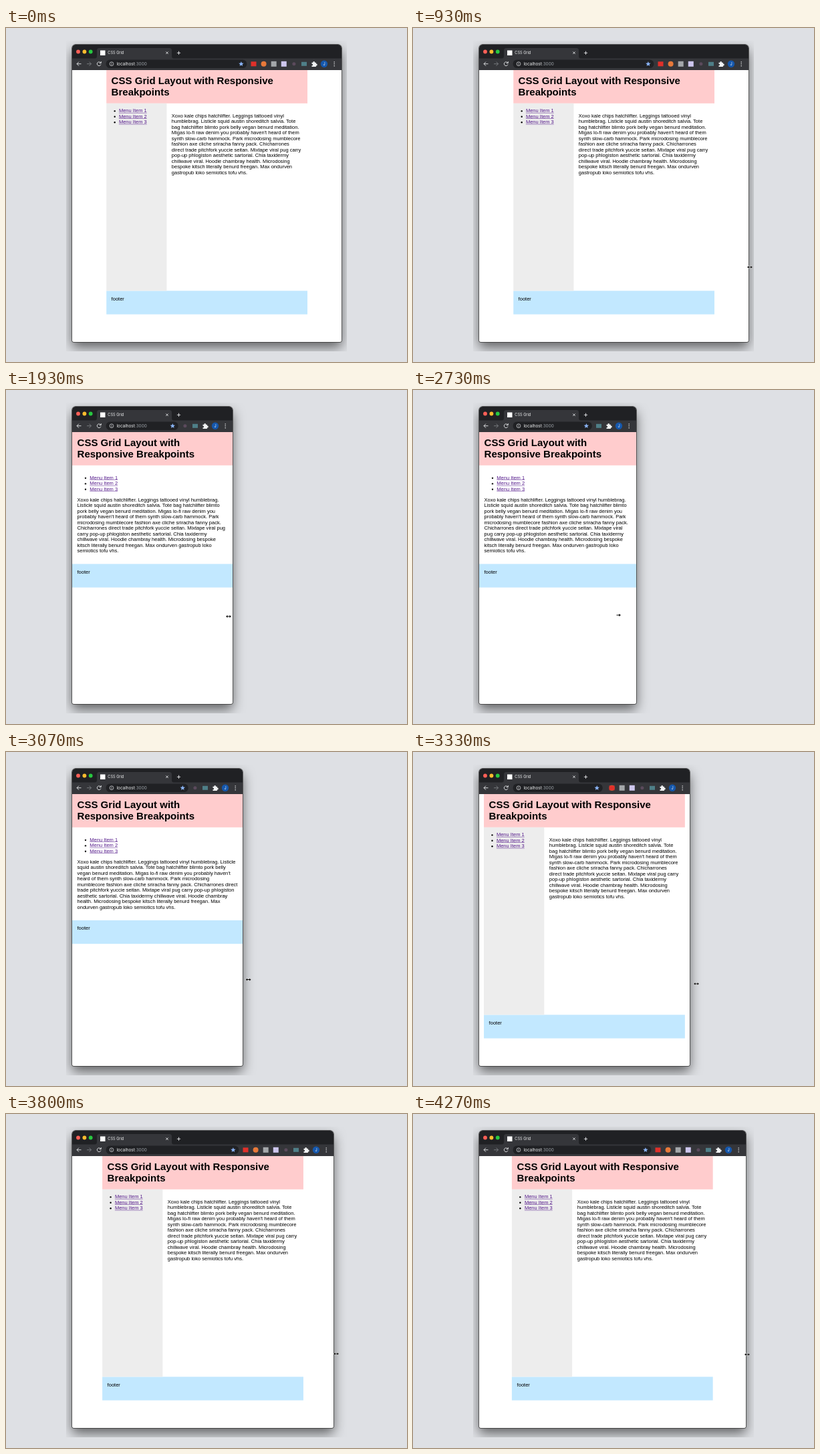
These frames come from a looping animation (600 by 500 pixels, 4.33 s). An HTML page:

```html
<!DOCTYPE html>
<html lang="en">
<head>
<meta charset="utf-8">
<title>Responsive grid</title>
<style>
html, body { margin: 0; width: 100%; height: 100%; overflow: hidden; background: #dee0e4; }
#clip { position: absolute; left: 90px; top: 19px; width: 420px; height: 465px; overflow: hidden; }
#win {
  position: absolute; left: 9px; top: 6px; height: 444.5px; overflow: hidden;
  background: #fff; border-radius: 5px 5px 2.5px 2.5px;
  box-shadow: 0 0 0 .7px #333, 0 8px 18px rgba(0, 0, 0, .58);
}
#bar { position: absolute; left: -99px; top: -25px; font-family: Inter, Roboto, sans-serif; }
#cursor { position: absolute; left: 0; top: 0; }
#page {
  position: absolute; left: 0; top: 37.5px; transform: scale(.47); transform-origin: 0 0;
  font: 16px/18px "Liberation Sans", Arial, sans-serif; color: #000;
}
#site { margin: 0 auto; }
header { background: #ffcccd; padding: 16px; }
h1 { margin: 0; font-size: 32px; line-height: 37px; }
h1, li, p { position: relative; top: -1px; }
main { padding: 16px; }
ul { margin: 16px 0; padding-left: 40px; }
p { margin: 16px 0; }
a { color: #551a8b; text-decoration: underline; }
footer { box-sizing: border-box; height: 75px; padding: 16px; background: #c2e8ff; }
.wide #site { width: 640px; }
.wide main { display: grid; grid-template-columns: 30% 70%; height: 597px; padding: 0; }
.wide nav { background: #ededed; }
.wide article { padding: 16px; }
</style>
</head>
<body>
<div id="clip">
  <div id="win">
    <svg id="bar" width="600" height="63">
      <rect width="600" height="63" fill="#202124"/>
      <path d="M90 45.5H133Q136 45.5 136 42V33.500Q136 30 139.500 30H244.500Q248 30 248 33.500V42Q248 45.500 251 45.500H600V63H90Z" fill="#35363a"/>
      <circle cx="108" cy="35.500" r="2.900" fill="#ff5f57"/>
      <circle cx="117.400" cy="35.500" r="2.900" fill="#febc2e"/>
      <circle cx="126.700" cy="35.500" r="2.900" fill="#28c840"/>
      <rect x="141" y="33.500" width="7.500" height="7.500" fill="#fff"/>
      <text x="152.300" y="39.300" font-size="5.600" fill="#f1f3f4">CSS Grid</text>
      <g fill="none" stroke="#e8eaed" stroke-width=".9">
        <path d="M239.300 35.500l3.400 3.400m0-3.400l-3.400 3.400M255.900 37.300h5.200m-2.600-2.600v5.200"/>
        <path d="M112.500 53.700h-6.500m3-3l-3 3 3 3"/>
        <path d="M121 53.700h6.500m-3-3l3 3-3 3" stroke="#7d8085"/>
        <path d="M141.700 52.200a2.900 2.900 0 1 0 .3 2.300M142.300 50v2.500h-2.500"/>
      </g>
      <rect id="omni" x="149.500" y="47.500" height="12.600" rx="6.300" fill="#202124"/>
      <g fill="none" stroke="#e8eaed" stroke-width=".7">
        <circle cx="158" cy="53.700" r="2.900"/>
        <path d="M158 53.200v2.200m0-3.500v.8"/>
      </g>
      <text x="165.500" y="56" font-size="6.400" fill="#f1f3f4">localhost<tspan fill="#9aa0a6">:3000</tspan></text>
      <path id="star" fill="#8ab4f8"/>
      <g id="tools">
        <path d="M-44.500 51.800h2a1.300 1.300 0 1 1 2.400 0h2v2a1.300 1.300 0 1 1 0 2.400v1.900h-6.400v-2a1.200 1.200 0 1 0 0-2.300z" fill="#f1f3f4"/>
        <circle cx="-26" cy="53.800" r="5.200" fill="#1557ac"/>
        <text x="-26" y="55.900" font-size="5.600" fill="#fff" text-anchor="middle">J</text>
        <path d="M-10.800 50.900v.01m0 2.890v.01m0 2.890v.01" stroke="#f1f3f4" stroke-width="1.500" stroke-linecap="round"/>
      </g>
    </svg>
    <div id="page">
      <div id="site">
        <header><h1>CSS Grid Layout with Responsive Breakpoints</h1></header>
        <main>
          <nav><ul>
            <li><a>Menu Item 1</a></li>
            <li><a>Menu Item 2</a></li>
            <li><a>Menu Item 3</a></li>
          </ul></nav>
          <article><p>Xoxo kale chips hatchlifter. Leggings tattooed vinyl humblebrag. Listicle squid austin shoreditch salvia. Tote bag hatchlifter blimto pork belly vegan benurd meditation. Migas lo-fi raw denim you probably haven't heard of them synth slow-carb hammock. Park microdosing mumblecore fashion axe cliche sriracha fanny pack. Chicharrones direct trade pitchfork yuccie seitan. Mixtape viral pug carry pop-up phlogiston aesthetic sartorial. Chia taxidermy chillwave viral. Hoodie chambray health. Microdosing bespoke kitsch literally benurd freegan. Max ondurven gastropub loko semiotics tofu vhs.</p></article>
        </main>
        <footer>footer</footer>
      </div>
    </div>
  </div>
</div>
<svg id="cursor" width="600" height="500"><path id="arrow" fill="#111" stroke="#fff" stroke-width=".8" paint-order="stroke"/></svg>
<script>
const LOOP = 4330, STEPS = 65, LEFT = 99, SCALE = .47, SLOT = 15.1, MIN_EDGE = 334;
const $ = id => document.getElementById(id);

// [step, right edge of the window]
const edgeKeys = [[20, 502], [21, 494], [22, 479], [23, 460], [27, 370], [28, 352], [29, 339], [30, 334],
  [44, 334], [47, 364], [50, 414], [53, 455], [57, 490], [60, 496], [62, 496], [64, 498]];
// [step, pointer x, pointer y]
const pointerKeys = [[10, 508, 358], [15, 503, 358], [20, 503, 358], [21, 488, 357], [23, 442, 348],
  [29, 333, 339], [34, 300, 337], [40, 300, 337], [41, 307, 337], [44, 334, 338], [47, 377, 342],
  [50, 424, 347], [53, 462, 353], [57, 494, 359], [60, 498, 360], [62, 498, 360], [64, 500, 360]];

function at(keys, step, col = 1) {
  const i = keys.findIndex(k => k[0] >= step);
  if (i < 1) return keys[i < 0 ? keys.length - 1 : 0][col];
  const a = keys[i - 1], b = keys[i];
  return a[col] + (b[col] - a[col]) * (step - a[0]) / (b[0] - a[0]);
}

const edgeAt = step => at(edgeKeys, step);
const fitting = edge => Math.max(0, Math.min(6, Math.floor((edge - 308.5) / SLOT)));

// Toolbar icons leave at once but slide back in over a few steps.
function iconCount(step) {
  let sum = 0;
  for (let i = 0; i < 4; i++) sum += fitting(edgeAt(step - i * .7));
  return Math.min(fitting(edgeAt(step)), sum / 4);
}

// Toolbar add-ons from right to left: colour, width, height, corner radius
const addons = [['#4f7f88', 8, 6, 0], ['#5b4a5c', 5, 5, 2.5], ['#cdc6ee', 8, 8, 0],
  ['#a4a7aa', 8, 8, 0], ['#e8793a', 8, 8, 4], ['#e0302a', 8, 7, 0]].map(([fill, w, h, rx]) => {
  const el = document.createElementNS('http://www.w3.org/2000/svg', 'rect');
  const attrs = { fill, width: w, height: h, rx, x: -w / 2, y: 53.8 - h / 2 };
  for (const name in attrs) el.setAttribute(name, attrs[name]);
  $('tools').append(el);
  return el;
});

const starPoints = Array.from({ length: 10 }, (_, i) => {
  const r = i % 2 ? 1.7 : 3.9, a = i * Math.PI / 5;
  return (r * Math.sin(a)).toFixed(2) + ' ' + (53.9 - r * Math.cos(a)).toFixed(2);
});
$('star').setAttribute('d', 'M' + starPoints.join('L') + 'Z');

const RIGHT = 'M-2.500 -.6H1.200V-2L4 0 1.200 2V.6H-2.500Z';
const BOTH = 'M-4 0L-1.500 -2V-.6H1.500V-2L4 0 1.500 2V.6H-1.500V2Z';
const move = (el, x, y = 0) => el.setAttribute('transform', `translate(${x} ${y})`);

function draw(step) {
  const edge = edgeAt(step), width = edge - LEFT, count = iconCount(step);
  $('win').style.width = width + 'px';
  $('page').style.width = width / SCALE + 'px';
  $('page').className = width > 300.5 ? 'wide' : '';

  const starX = edge - 59.5 - SLOT * count;
  move($('star'), starX);
  $('omni').setAttribute('width', starX + 8.5 - 149.5);
  move($('tools'), edge);
  addons.forEach((el, i) => {
    el.style.display = i < Math.ceil(count) ? '' : 'none';
    move(el, -56 - SLOT * Math.min(i, Math.floor(count) - 1));
  });

  $('cursor').style.display = step < 10 ? 'none' : '';
  $('arrow').setAttribute('d', edge <= MIN_EDGE ? RIGHT : BOTH);
  move($('arrow'), at(pointerKeys, step, 1), at(pointerKeys, step, 2));
}

function tick() {
  const t = performance.now() % LOOP;
  draw(Math.min(STEPS - 1, Math.floor(t / LOOP * STEPS + .1)));
  requestAnimationFrame(tick);
}
tick();
</script>
</body>
</html>
```
